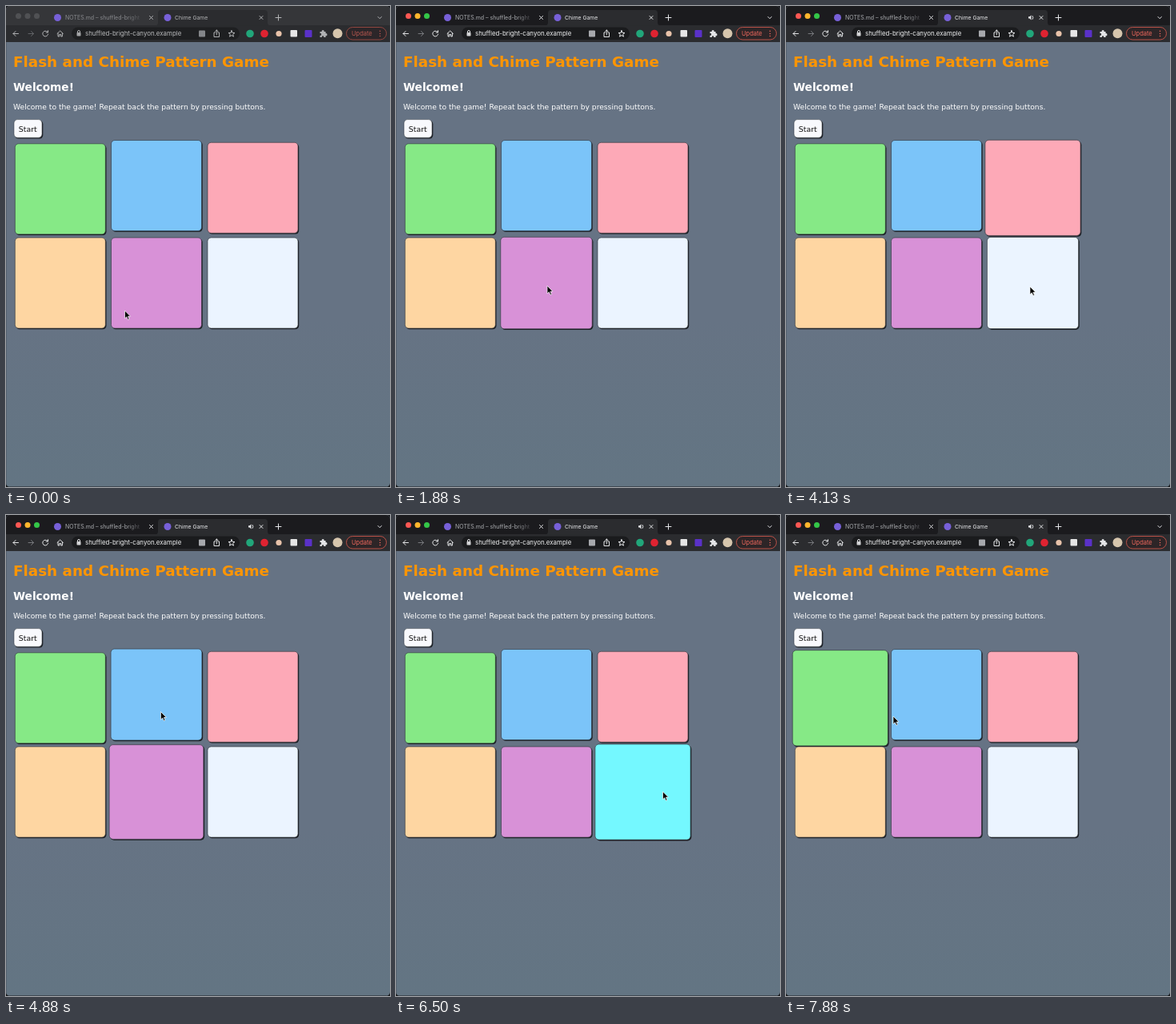
An HTML page for the animation above (8000 ms loop, 480 by 600 pixels).

```html
<!DOCTYPE html>
<html lang="en">
<head>
<meta charset="utf-8">
<title>Chime Game</title>
<style>
  html, body { margin: 0; width: 100%; height: 100%; overflow: hidden; background: #17181a; }
  svg { display: block; width: 480px; height: 600px; }
  .ui { font-family: Inter, Roboto, sans-serif; }
  .page { font-family: "DejaVu Sans", Verdana, sans-serif; }
  .line { fill: none; stroke: #e4e5e7; stroke-width: 1; stroke-linecap: round; stroke-linejoin: round; }
</style>
</head>
<body>
<svg viewBox="0 0 480 600">
  <defs>
    <linearGradient id="slate" x2="0" y2="1">
      <stop stop-color="#667384"/><stop offset=".65" stop-color="#667384"/><stop offset="1" stop-color="#637583"/>
    </linearGradient>
    <linearGradient id="fade" gradientUnits="userSpaceOnUse" x1="150" x2="173">
      <stop stop-color="#a9abaf"/><stop offset="1" stop-color="#a9abaf" stop-opacity="0"/>
    </linearGradient>
    <clipPath id="window"><rect width="480" height="600" rx="5"/></clipPath>
  </defs>

  <g clip-path="url(#window)">
    <rect width="480" height="600" fill="url(#slate)"/>
    <rect id="strip" width="480" height="25"/>
    <rect y="24" width="480" height="21" fill="#2b2c2f"/>
    <path d="M186 24.5q4 0 4-4V9q0-4 4-4H323q4 0 4 4v11.500q0 4 4 4z" fill="#2b2c2f"/>

    <g class="ui">
      <g id="lights"></g>
      <circle cx="64.500" cy="14.500" r="4.500" fill="#7760d8"/>
      <circle cx="202" cy="14.500" r="4.500" fill="#7760d8"/>
      <g id="chrome">
        <text x="74" y="17" font-size="7" fill="url(#fade)">NOTES.md – shuffled-bright</text>
        <text x="211" y="17" font-size="6.800" fill="#e4e5e7">Chime Game</text>
        <g class="line">
          <path d="M179.500 12.500l4 4m0-4l-4 4M317 12.500l4 4m0-4l-4 4M337 14.500h7m-3.500-3.500v7M465 13.500l2.200 2.200l2.200-2.200"/>
          <path d="M15.500 34.500h-6.500m3-3l-3 3l3 3"/>
          <path d="M28 34.500h6.500m-3-3l3 3l-3 3" stroke="#77797d"/>
          <path d="M51.800 32.300a3.400 3.400 0 1 0 .8 2.800M52.500 30.700v2.300h-2.300"/>
          <path d="M64 34.500l3.700-3.500l3.700 3.500M65 34v4h1.700v-2.500h2v2.500h1.700v-4"/>
        </g>
        <rect x="82" y="26.500" width="210" height="15.500" rx="7.750" fill="#1a1b1d"/>
        <rect x="88.500" y="33" width="5" height="4.500" rx=".8" fill="#d3d4d6"/>
        <path class="line" d="M89.500 33v-1a1.500 1.500 0 0 1 3 0v1" stroke-width=".8"/>
        <text x="99" y="37.300" font-size="7.900" fill="#f0f1f2">shuffled-bright-canyon.example</text>
        <rect x="241" y="30.500" width="8" height="8" rx="1" fill="#a7a9ad"/>
        <g class="line" stroke-width=".9">
          <path d="M261.500 33h-1.500v5.500h6.500v-5.500h-1.500M263.300 36v-6m-1.700 1.700l1.700-1.700l1.700 1.700"/>
          <path id="star"/>
        </g>
        <path d="M392.500 32h2.200a1.500 1.500 0 1 1 2.900 0h2v2.200a1.500 1.500 0 1 1 0 2.900v1.900h-2.300a1.300 1.300 0 1 0-2.500 0h-2.300v-2.300a1.300 1.300 0 1 0 0-2.500z" fill="#e4e5e7"/>
        <rect x="425.500" y="26.500" width="50" height="15.500" rx="7.750" fill="#2d2527" stroke="#c9554b" stroke-width=".9"/>
        <text x="432" y="37" font-size="7.500" fill="#f0685d">Update</text>
        <path d="M467.500 31.200h.01m0 3.200h.01m0 3.200h.01" class="line" style="stroke:#f0685d;stroke-width:1.5"/>
      </g>
      <circle cx="305" cy="34.500" r="4.800" fill="#21a67a"/>
      <circle cx="323" cy="34.500" r="4.800" fill="#df2331"/>
      <circle cx="341" cy="34.500" r="3.600" fill="#e9c3aa"/>
      <rect x="355.500" y="30" width="8.500" height="8.500" rx="1" fill="#e6e6e6"/>
      <rect x="373.500" y="30" width="9" height="9" rx="1" fill="#5a31c8"/>
      <circle cx="414.500" cy="34.200" r="6" fill="#d6c6ad"/>
      <g id="speaker">
        <path d="M303 13.200h1.500l2-1.800v6l-2-1.800h-1.500z" fill="#e4e5e7"/>
        <path class="line" d="M308.200 12.500q1.600 2 0 4" stroke-width=".8"/>
      </g>
    </g>

    <g class="page" fill="#fff">
      <text x="9" y="76" font-size="18.350" font-weight="700" fill="#ff9500">Flash and Chime Pattern Game</text>
      <text x="9" y="106" font-size="13.700" font-weight="700">Welcome!</text>
      <text x="9" y="129.300" font-size="9.170">Welcome to the game! Repeat back the pattern by pressing buttons.</text>
      <rect x="11" y="142.800" width="35.300" height="22.700" rx="4.500" fill="#1d2126"/>
      <rect x="10" y="141.600" width="35" height="22.600" rx="4.500" fill="#f8f9fd" stroke="#30363d" stroke-width=".5"/>
      <text x="15.800" y="156.500" font-size="9.400" fill="#111">Start</text>
    </g>

    <g id="tiles"></g>
    <path d="M.4 45V600" stroke="#505b68" stroke-width=".8"/>
    <path d="M0 599.500H480" stroke="#3f4852"/>
  </g>
  <path id="cursor" d="M0 0V9.800L2.300 7.700L3.900 11.300L5.500 10.600L4 7.100H7Z" fill="#000" stroke="#fff" stroke-width=".7" stroke-linejoin="round"/>
</svg>

<script>
const LOOP = 8000, FOCUS_AT = 500, SOUND_AT = 3560;
const SIZE = 113, GROWTH = 0.055, EASE_MS = 260;
const $ = id => document.getElementById(id);

function add(parent, name, attrs) {
  const el = document.createElementNS('http://www.w3.org/2000/svg', name);
  for (const key in attrs) el.setAttribute(key, attrs[key]);
  return parent.appendChild(el);
}

// hover: [enter, leave] pairs; press: [down, up]
const tiles = [
  { x: 11.3, y: 171.8, color: '#86e986', hover: [[7330, 7880]] },
  { x: 131.5, y: 167.5, color: '#7bc4f9', lit: '#6aaffa', hover: [[4820, 5500], [7900, 9000]], press: [5250, 5570] },
  { x: 252, y: 170.3, color: '#fda9b7', hover: [[2400, 2896], [3330, 4125]] },
  { x: 11.3, y: 289, color: '#fed6a2', hover: [] },
  { x: 131.5, y: 289, color: '#d891d7', hover: [[1800, 2320], [4560, 4800], [5490, 5740], [6980, 7170]] },
  { x: 252, y: 289, color: '#ebf4ff', lit: '#74f8ff', hover: [[2904, 3310], [4060, 4540], [5780, 6930]], press: [6330, 6680] }
];

for (const tile of tiles) {
  const mid = SIZE / 2;
  tile.group = add($('tiles'), 'g', {});
  add(tile.group, 'rect', { x: 1.2 - mid, y: 1.3 - mid, width: SIZE, height: SIZE, rx: 4.5, fill: '#1c2025' });
  tile.face = add(tile.group, 'rect', { x: -mid, y: -mid, width: SIZE, height: SIZE, rx: 4.5, stroke: '#2b3036', 'stroke-width': 0.6 });
}

const lights = ['#fc5753', '#fdb62d', '#34c648'].map((color, i) => ({
  color, el: add($('lights'), 'circle', { cx: 15.5 + 11.5 * i, cy: 12.5, r: 3.5 })
}));

const starPoints = Array.from({ length: 10 }, (_, i) => {
  const a = i * Math.PI / 5, r = i % 2 ? 1.8 : 4.2;
  return (282 + r * Math.sin(a)).toFixed(2) + ' ' + (34.8 - r * Math.cos(a)).toFixed(2);
});
$('star').setAttribute('d', 'M' + starPoints.join('L') + 'Z');

// time, x, y of the pointer tip
const path = [
  [0, 148.5, 380], [600, 148.5, 380], [1880, 189, 349], [2250, 205, 335],
  [2600, 300, 245], [2760, 300, 245], [3000, 301, 351], [3200, 302, 352],
  [3500, 304, 245], [3900, 304, 245], [4130, 305, 350], [4400, 300, 350],
  [4900, 193, 245], [5300, 193, 245], [5500, 198.5, 324], [5620, 210, 340],
  [6000, 330, 346], [6500, 333.5, 345], [6750, 333, 345], [7400, 85, 245],
  [7680, 85, 247], [7880, 134, 251], [8000, 160, 252]
];

const ease = p => (p = Math.min(1, Math.max(0, p)), p * p * (3 - 2 * p));

function pointer(t) {
  const i = Math.max(1, path.findIndex(key => key[0] > t));
  const [t0, x0, y0] = path[i - 1], [t1, x1, y1] = path[i];
  const p = ease((t - t0) / (t1 - t0));
  return [x0 + (x1 - x0) * p, y0 + (y1 - y0) * p];
}

function draw(t) {
  const active = t >= FOCUS_AT;
  $('strip').setAttribute('fill', active ? '#1b1b1e' : '#353639');
  $('chrome').setAttribute('opacity', active ? 1 : 0.72);
  for (const { el, color } of lights) el.setAttribute('fill', active ? color : '#505154');
  $('speaker').setAttribute('opacity', t >= SOUND_AT ? 1 : 0);

  for (const { x, y, color, lit, hover, press, group, face } of tiles) {
    let grown = 0;
    for (const [enter, leave] of hover) grown += ease((t - enter) / EASE_MS) - ease((t - leave) / EASE_MS);
    const scale = 1 + GROWTH * grown;
    group.setAttribute('transform', `translate(${x + SIZE / 2} ${y + SIZE / 2}) scale(${scale})`);
    face.setAttribute('fill', press && t >= press[0] && t < press[1] ? lit : color);
  }
  $('cursor').setAttribute('transform', `translate(${pointer(t)})`);
}

const start = performance.now();
function tick() {
  draw((performance.now() - start) % LOOP);
  requestAnimationFrame(tick);
}
draw(0);
requestAnimationFrame(tick);
</script>
</body>
</html>
```
